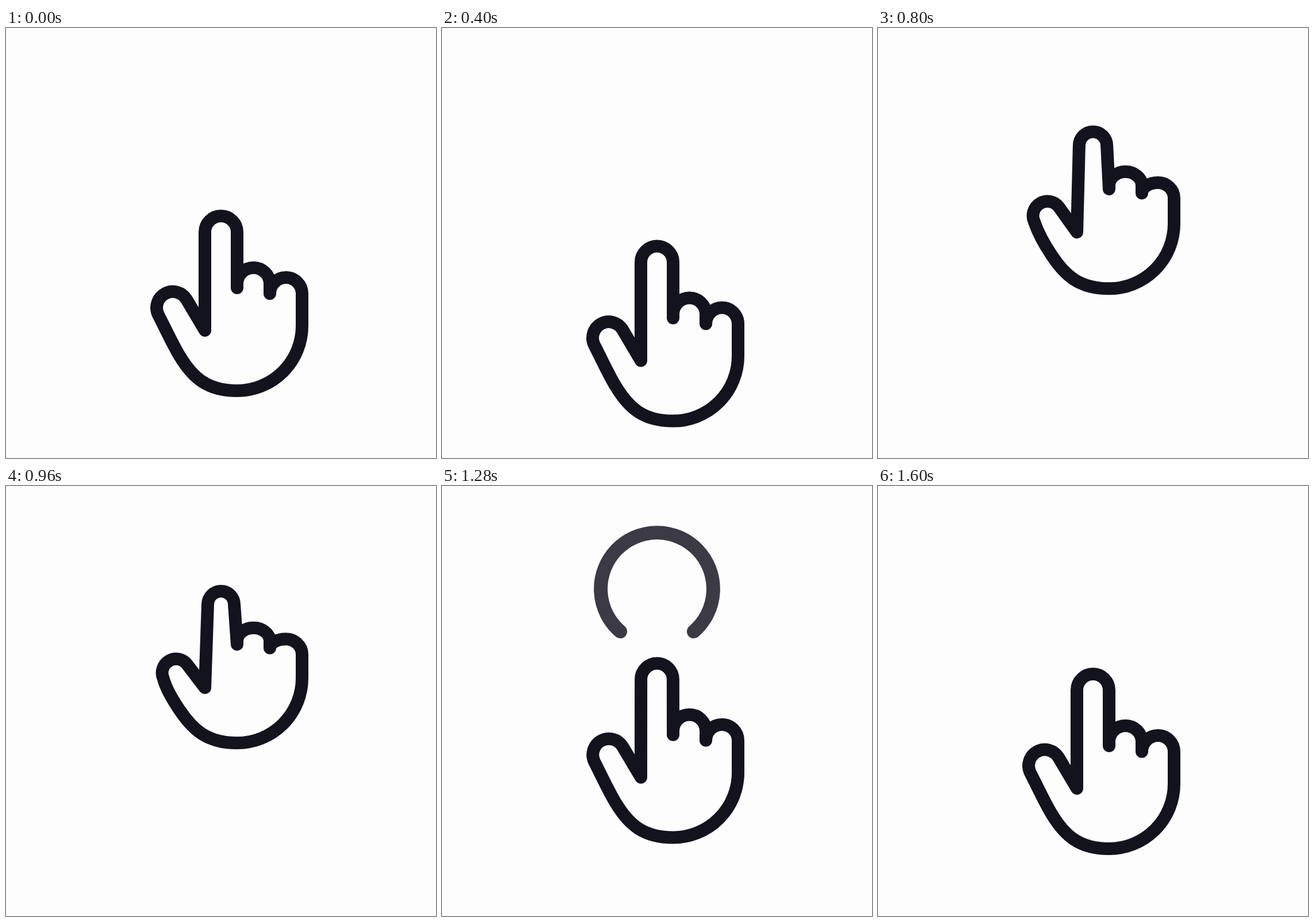
Recreate the animation shown at these times as an HTML page. Size 748 by 748 pixels, loop 1680 ms.

```html
<!DOCTYPE html>
<html>
<head>
<meta charset="utf-8">
<title>Tap</title>
<style>
  html, body { margin: 0; width: 100%; height: 100%; overflow: hidden; background: #fdfdfd; }
  svg { display: block; width: 100%; height: 100%; }
  path { fill: none; stroke-linecap: round; stroke-linejoin: round; }
</style>
</head>
<body>
<svg viewBox="0 0 748 748">
  <path id="ring" stroke="#3b3a45"/>
  <path id="hand" stroke="#12131d" stroke-width="22"/>
</svg>
<script>
const LOOP = 1680, STEP = 80;
const ring = document.getElementById('ring');
const hand = document.getElementById('hand');

// Each "a~b" runs from the relaxed to the pressed hand.
const OUTLINE = `M346 526~533 L346~350 355~383
  A28~24 28~24 0 0 1 402~398 355~383 L402 452~458 L402 445~452
  A28.5 28~24 0 0 1 459 445~452 L459 462~465
  A28 28~18 0 0 1 487 434~447
  A28 28~27 0 0 1 515 462~474 L515 518
  A113 113 0 0 1 402 631
  C350 631 325 608 303~302 572~573
  C290 551~555 278 524~533 265~272 499~515
  A28~25 28~25 0 0 1 314~315 472~490 Z`;

const span = (t, a, b) => Math.min(1, Math.max(0, (t - a) / (b - a)));
const ease = u => (1 - Math.cos(Math.PI * u)) / 2;
const move = (t, a, b) => ease(span(t, a, b));

function drawHand(t) {
  const press = 1.3 * (move(t, 700, 850) - move(t, 906, 1321));
  const y = 88 * ease(span(t, 160, 480) ** 2)
    - 278 * move(t, 480, 850) + 190 * move(t, 906, 1378);
  hand.setAttribute('d', OUTLINE.replace(/([\d.]+)~([\d.]+)/g,
    (_, a, b) => +a + (b - a) * press));
  hand.setAttribute('transform', `translate(0 ${y})`);
}

function drawRing(t) {
  const r = 149 * Math.sin(Math.PI / 2 * span(t, 988, 1628));
  const gap = (58 - 0.176 * r) * Math.PI / 180;
  const dx = r * Math.sin(gap), y = 179 + r * Math.cos(gap);
  ring.setAttribute('d', `M${374 - dx} ${y}A${r} ${r} 0 1 1 ${374 + dx} ${y}`);
  ring.setAttribute('stroke-width', 20 + 0.04 * r);
  ring.setAttribute('opacity', r > 0 ? 1 - span(t, 1280, 1600) : 0);
}

function frame(now) {
  const t = Math.floor(now % LOOP / STEP) * STEP;
  drawHand(t);
  drawRing(t);
  requestAnimationFrame(frame);
}
frame(0);
</script>
</body>
</html>
```
